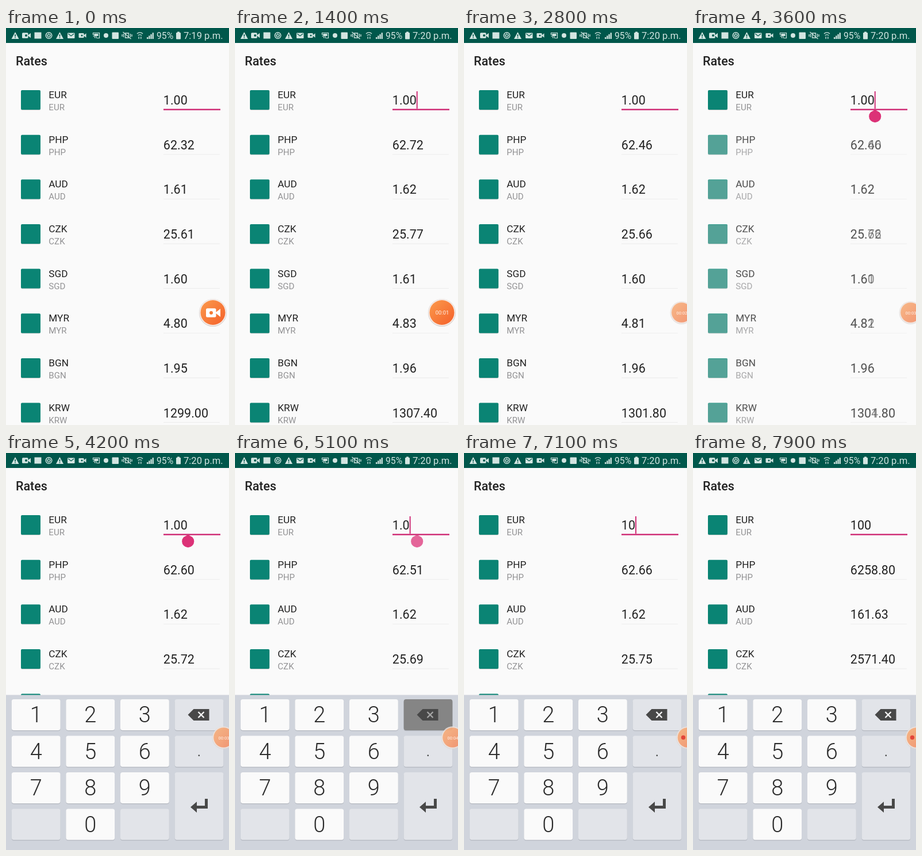
These frames come from a looping animation (388x690 px, 8 s). An HTML page with a canvas:

```html
<!DOCTYPE html>
<html lang="en">
<head>
<meta charset="utf-8">
<title>Rates</title>
<style>
  html, body { margin: 0; width: 100%; height: 100%; overflow: hidden; background: #fafafa; }
  canvas { display: block; }
</style>
</head>
<body>
<canvas id="stage" width="388" height="690"></canvas>
<script>
const ctx = document.getElementById('stage').getContext('2d');
const LOOP = 8000;
const PINK = '#d03078';
const ROW = 77.65;
const DELETES = [5050, 5300, 5550];
const ZEROS = [6900, 7250];

// One value per rate update; the last one holds when a list ends early.
const RATES = {
  PHP: [62.32, 62.72, 62.47, 62.46, 62.60, 62.51, 62.75, 62.66, 6258.8],
  AUD: [1.61, 1.62, 1.62, 1.62, 1.62, 1.62, 1.63, 1.62, 161.63],
  CZK: [25.61, 25.77, 25.67, 25.66, 25.72, 25.69, 25.78, 25.75, 2571.4],
  SGD: [1.60, 1.61, 1.60, 1.60, 1.61],
  MYR: [4.80, 4.83, 4.81, 4.81, 4.82],
  BGN: [1.95, 1.96],
  KRW: [1299, 1307.4, 1302.2, 1301.8, 1304.8],
};

const clamp = v => Math.min(1, Math.max(0, v));
const ramp = (t, start, length) => clamp((t - start) / length);
const easeOut = p => 1 - (1 - p) ** 3;
const mix = (a, b, p) => a + (b - a) * p;
const pressed = (t, times) => times.some(d => t >= d - 50 && t < d + 100);

function text(str, x, y, size, color = '#212121', weight = 400, align = 'left') {
  ctx.font = `${weight} ${size}px Roboto, sans-serif`;
  ctx.textAlign = align;
  ctx.fillStyle = color;
  ctx.fillText(str, x, y);
}

function rect(x, y, w, h, color, r = 0) {
  ctx.fillStyle = color;
  ctx.beginPath();
  ctx.roundRect(x, y, w, h, r);
  ctx.fill();
}

function circle(x, y, r, color) {
  ctx.fillStyle = color;
  ctx.beginPath();
  ctx.arc(x, y, r, 0, Math.PI * 2);
  ctx.fill();
}

function shape(d, color, x = 0, y = 0) {
  ctx.save();
  ctx.translate(x, y);
  ctx.fillStyle = color;
  ctx.fill(new Path2D(d), 'evenodd');
  ctx.restore();
}

function line(d, color, width, x = 0, y = 0) {
  ctx.save();
  ctx.translate(x, y);
  ctx.strokeStyle = color;
  ctx.lineWidth = width;
  ctx.stroke(new Path2D(d));
  ctx.restore();
}

function withAlpha(alpha, draw) {
  ctx.save();
  ctx.globalAlpha = alpha;
  draw();
  ctx.restore();
}

function camera(x, y, w, color) {
  const h = w * 0.62;
  rect(x - w / 2, y - h / 2, w * 0.7, h, color, w * 0.1);
  shape(`M${w * 0.14} 0L${w / 2} ${-h * 0.45}V${h * 0.45}Z`, color, x, y);
}

function statusBar(t) {
  const ink = '#d3e5e1', bar = '#00574b';
  rect(0, 0, 388, 26, bar);
  for (const x of [16, 93.5])
    shape('M0-6L6.5 6H-6.5ZM-.8-2V2H.8V-2ZM-.8 3V4.5H.8V3Z', ink, x, 13);
  camera(35.5, 13, 15, ink);
  circle(35, 13, 2, bar);
  rect(49.5, 7.5, 12, 11, ink);
  line('M5.3 0A5.3 5.3 0 1 1-5.3 0A5.3 5.3 0 1 1 5.3 0M0-4V0M-2-2A2.7 2.7 0 1 0 2-2', ink, 1.4, 74.5, 13);
  rect(107, 8.5, 12.5, 9.5, ink, 1);
  line('M-5-3L0 .8L5-3', bar, 1.2, 113.2, 13);
  camera(133, 13, 13, ink);
  circle(132, 13, 1.5, bar);
  line('M-5.5-1V-4.5H5.5V4.5H1M-5.5 1A4 4 0 0 1-2 4.7M-5.5-1.5A6 6 0 0 1 .5 4.7', ink, 1.2, 157, 13);
  rect(153.5, 10, 7, 4, ink);
  circle(174, 13, 4, ink);
  rect(184.5, 7.5, 11.5, 11.5, ink, 1);
  line('M-3-4H3V4H-3ZM-6-3V3M6-3V3M-8.5-2V2M8.5-2V2M-7-6L7 6', ink, 1.3, 210.5, 13);
  line('M-5-3A7 7 0 0 1 5-3M-3.2 0A4.5 4.5 0 0 1 3.2 0M-1.8 6V2M1.8 2V6', ink, 1.3, 233, 13);
  for (let i = 0; i < 4; i++) rect(245 + i * 3.2, 16 - i * 2.6, 2.3, 3 + i * 2.6, ink);
  text('95%', 262, 19, 15.7, ink);
  rect(296, 8, 8, 11.5, ink, 1);
  rect(298, 6.5, 4, 2, ink);
  text(t < 700 ? '7:19 p.m.' : '7:20 p.m.', 309, 19, 16.6, ink);
}

function row(index, code, value) {
  const y = index * ROW;
  rect(26, y + 109.5, 34, 33.5, '#c9cfce', 2);
  rect(26, y + 108, 34, 34, '#0a8474', 2);
  text(code, 74.3, y + 122, 17.2);
  text(code, 74.3, y + 143, 15.1, '#929294');
  text(value, 273.8, y + 133, 21.5);
  if (index) rect(274, y + 141.5, 98, 1, '#ececec');
  else rect(274, 140.5, 99, 2.5, PINK);
}

function amountAt(t) {
  const gone = DELETES.filter(d => t >= d).length;
  return '1.00'.slice(0, 4 - gone) + '0'.repeat(ZEROS.filter(z => t >= z).length);
}

function cursor(t, amount) {
  const reset = [300, 3400, ...DELETES, ...ZEROS].filter(r => r <= t).pop() ?? -700;
  if ((t - reset) % 1000 < 500) {
    ctx.font = '400 21.5px Roboto, sans-serif';
    rect(273.8 + ctx.measureText(amount).width, 110, 2, 30.5, PINK);
  }
  if (t >= 3450 && t < 5250)
    withAlpha(1 - ramp(t, 5050, 200), () =>
      shape('M0-11.5L7.6-7.3A10.6 10.6 0 1 1-7.6-7.3Z', '#dc3277', 316.7, 153.5));
}

function rates(t) {
  const amount = amountAt(t);
  row(0, 'EUR', amount);
  const tick = Math.max(0, Math.floor((t + 525) / 1000));
  const fade = tick ? ramp(t, tick * 1000 - 525, 250) : 1;
  Object.entries(RATES).forEach(([code, list], i) => {
    const draw = k => row(i + 1, code, list[Math.min(k, list.length - 1)].toFixed(2));
    if (fade < 1) withAlpha(1 - fade, () => draw(tick - 1));
    withAlpha(fade, () => draw(tick));
  });
  cursor(t, amount);
}

function keyboard(t) {
  const rise = easeOut(ramp(t, 3800, 280));
  if (!rise) return;
  ctx.save();
  ctx.translate(0, 270 * (1 - rise));
  rect(0, 420.5, 388, 270, '#d0d4dc');
  const key = (col, line, color, rows = 1) => {
    const x = 9.8 + col * 94.6, y = 428 + line * 63.5, h = rows * 63.5 - 9.5;
    rect(x, y + 1.3, 84.8, h, '#b4b8c0', 4);
    rect(x, y, 84.8, h, color, 4);
  };
  const white = '#fafafa', grey = '#e2e4e9', down = '#858585', ink = '#484848';
  for (let i = 0; i < 10; i++) {
    const col = i < 9 ? i % 3 : 1, line = Math.floor(i / 3);
    const digit = (i + 1) % 10;
    key(col, line, digit === 0 && pressed(t, ZEROS) ? down : white);
    text(digit, 52.2 + col * 94.6, 468 + line * 63.6, 38, '#2b2b2b', 300, 'center');
  }
  const deleting = pressed(t, DELETES);
  key(0, 3, grey);
  key(2, 3, grey);
  key(3, 0, deleting ? down : grey);
  key(3, 1, grey);
  key(3, 2, grey, 2);
  shape('M-19 0L-9-10H18V10H-9Z', ink, 335.5, 455);
  line('M-1-5L9 5M9-5L-1 5', deleting ? '#a5a5a5' : '#f4f4f4', 2.4, 335.5, 455);
  text('.', 336, 527, 24, ink, 400, 'center');
  shape('M15-13V4H-4V11L-15 1.5L-4-8V-1H10V-13Z', ink, 336, 614);
  ctx.restore();
}

function recorder(t) {
  const dock = easeOut(ramp(t, 1700, 250));
  const hide = easeOut(ramp(t, 5700, 250));
  const x = mix(mix(360, 378.5, dock), 389, hide), y = 494.5;
  const r = mix(21.5, 17.3, dock);
  withAlpha(mix(1, 0.6, dock), () => {
    circle(x, y + 0.5, r + 2.6, '#d9d4d2');
    circle(x, y, r + 1.8, '#f8e9e2');
    const fill = ctx.createLinearGradient(x - r, y - r, x + r, y + r);
    fill.addColorStop(0, '#fb9a4c');
    fill.addColorStop(1, '#f4602a');
    circle(x, y, r, fill);
  });
  if (t < 300) {
    camera(360.5, 495, 25, '#fff');
    circle(357, 495, 3, '#f67b35');
  } else if (t < 5700) {
    const seconds = Math.floor((t - 300) / 1000);
    text('00:0' + seconds, x + 0.5, y + 3.3, mix(9.4, 7.6, dock), '#fff3ec', 400, 'center');
  } else {
    circle(x - 7.5, y, 3.7, '#e2453a');
  }
}

function frame(now) {
  const t = now % LOOP;
  rect(0, 0, 388, 690, '#fafafa');
  text('Rates', 17, 64.5, 21.5, '#212121', 500);
  rates(t);
  keyboard(t);
  recorder(t);
  statusBar(t);
  requestAnimationFrame(frame);
}
requestAnimationFrame(frame);
</script>
</body>
</html>
```
